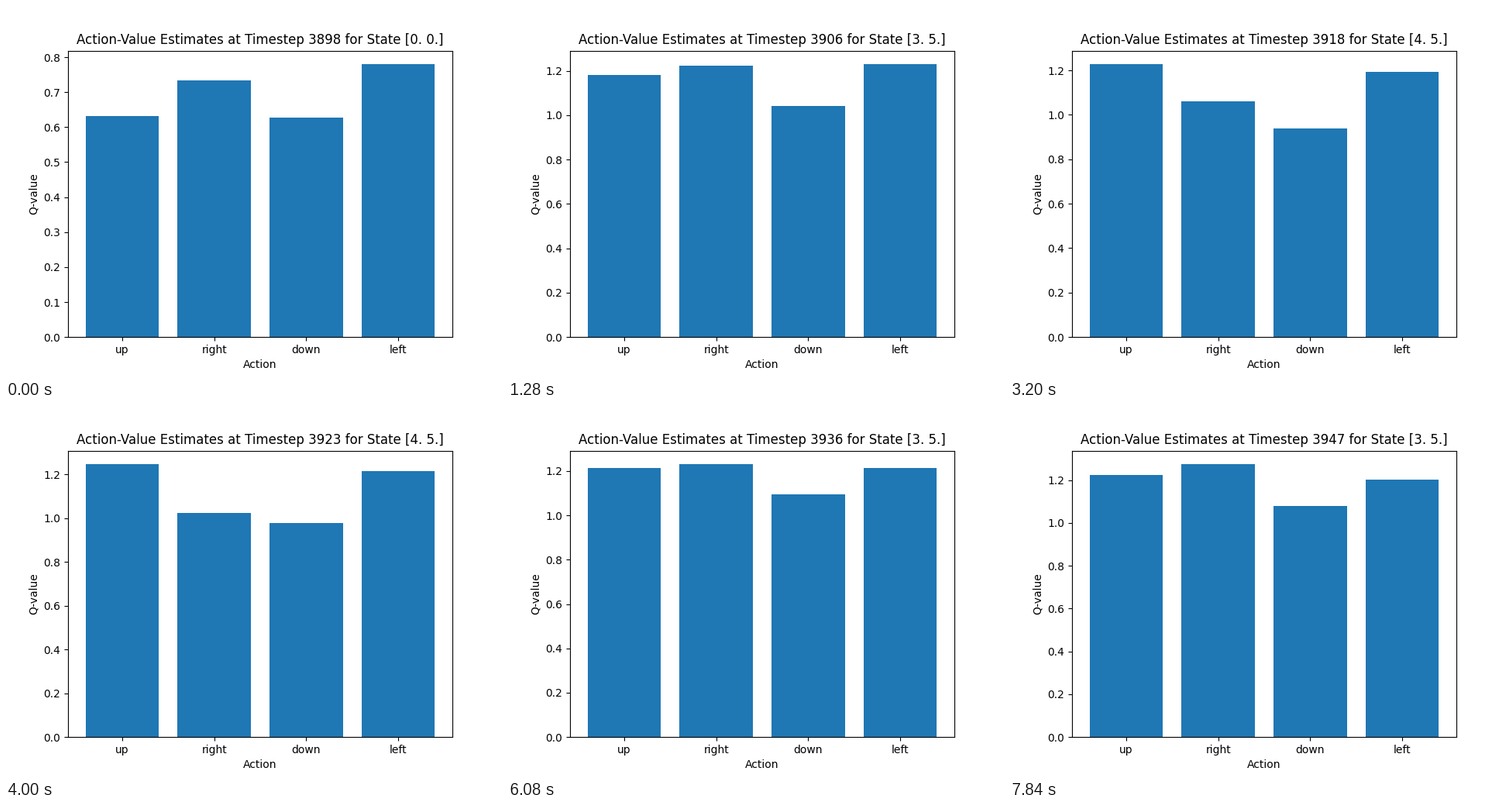
These frames come from a looping animation (640 px wide and 480 px high, 8 s). A matplotlib script:

```python
import matplotlib.pyplot as plt
import numpy as np
from matplotlib.animation import FuncAnimation

FRAMES = 50
INTERVAL = 160
FIRST_STEP = 3898
ARRIVAL = 8            # ticks needed to walk from (0, 0) to (3, 5)
ACTIONS = ["up", "right", "down", "left"]

# Q-values at the start of the walk, and how far learning strays from a line
START = np.array([0.632, 0.7335, 0.6275, 0.7797])
SWAY = np.array([0.0025, -0.0318, 0.027, 0.005])

# Row of the cell: (first tick, last tick, first values, last values)
LEARNING = {
    3: (8, 49, np.array([1.1825, 1.2245, 1.0427, 1.2297]),
        np.array([1.2236, 1.2735, 1.0789, 1.2019])),
    4: (16, 30, np.array([1.2131, 1.0760, 0.9210, 1.1790]),
        np.array([1.2620, 1.0297, 0.9760, 1.2305])),
}


def state(tick):
    if tick < ARRIVAL:
        row = round(3 * tick / ARRIVAL)
        return row, tick - row
    return (4 if 13 <= tick < 34 else 3), 5


def q_values(tick):
    if tick < ARRIVAL:
        # discounted values grow geometrically towards the goal
        goal = LEARNING[3][2]
        return START * (goal / START) ** (tick / ARRIVAL)
    begin, end, first, last = LEARNING[state(tick)[0]]
    u = np.clip((tick - begin) / (end - begin), 0, 1)
    return first + (last - first) * u + SWAY * np.sin(np.pi * u ** 3)


fig, ax = plt.subplots(figsize=(6.4, 4.8), dpi=100)


def draw(tick):
    row, col = state(tick)
    ax.clear()
    ax.bar(ACTIONS, q_values(tick), color="#1f77b4")
    ax.set_xlabel("Action")
    ax.set_ylabel("Q-value")
    ax.set_title(f"Action-Value Estimates at Timestep {FIRST_STEP + tick} "
                 f"for State [{row}. {col}.]")
    return ax.patches


anim = FuncAnimation(fig, draw, frames=FRAMES, interval=INTERVAL,
                     init_func=lambda: draw(0), repeat=True, repeat_delay=0)
plt.show()
```
